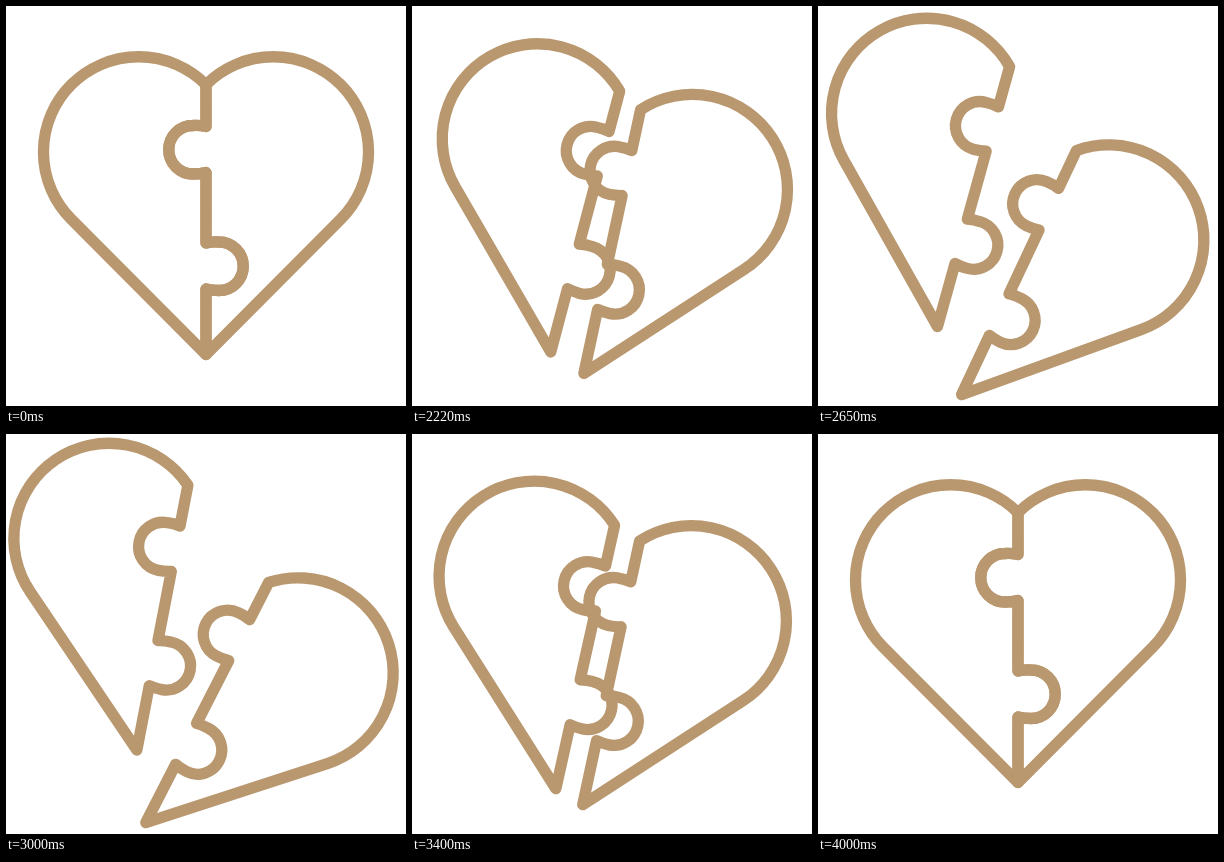
Write an HTML page that moves like this. It is 400 px wide and 400 px high and loops after 4020 ms.

```html
<!DOCTYPE html>
<html lang="en">
<head>
<meta charset="utf-8">
<title>Broken heart</title>
<style>
  html, body { margin: 0; height: 100%; overflow: hidden; background: #fff; }
  svg { display: block; width: 100%; height: 100%; }
  path { fill: none; stroke: #b9986f; stroke-width: 11.3; stroke-linecap: round; stroke-linejoin: round; }
</style>
</head>
<body>
<svg viewBox="0 0 400 400"><path id="left"/><path id="right"/></svg>
<script>
const LOOP = 4020, START = 2000, END = 4000, FIRST_STEP = 2020;

// Both halves share the jigsaw edge; the origin is its middle.
const edge = 'M0-134.3V-92.5Q-7-94-13-93.5A24.2 24.2 0 0 0-13-45Q-6-45 0-46.5' +
  'V24Q7 22.5 13 23A24.2 24.2 0 0 1 13 71.5Q6 71.5 0 70V135.5';

// A half is its side (-1 left, 1 right) with a semicircular lobe.
const halves = ['left', 'right'].map((id, i) => {
  const el = document.getElementById(id), side = 2 * i - 1;
  el.setAttribute('d', `${edge}L${134.7 * side} .2A95 95 0 0 ${1 - i} 0-134.3Z`);
  return { el, side };
});

// Key poses are [time, x, y, angle]; every track starts and ends at zero.
const track = (end, ...keys) => [[START, 0, 0, 0], ...keys, [end, 0, 0, 0]];
const hold = (from, to, ...pose) => [[from, ...pose], [to, ...pose]];

// The heart swings as a whole while the halves move apart by equal amounts.
const swing = track(END,
  [2400, -22.7, 20.7, 23.3],
  ...hold(2800, 3050, -21, 12.5, 19),
  [3400, -13.7, 17.3, 12.4],
  [3640, -3, -16, -5.7]);
const gap = track(3520,
  [2400, 23.3, 22.3, -2.3],
  ...hold(2800, 3050, 22.5, 42.5, 8.1),
  [3400, 13, 8, -0.2]);

// Slope at a key: flat at ends and turning points, so curves never overshoot.
function slope(keys, i, k) {
  if (i === 0 || i === keys.length - 1) return 0;
  const rate = j => (keys[j + 1][k] - keys[j][k]) / (keys[j + 1][0] - keys[j][0]);
  const a = rate(i - 1), b = rate(i);
  return a * b > 0 ? 2 * a * b / (a + b) : 0;
}

function valueAt(keys, t, k) {
  const next = keys.findIndex(key => key[0] > t);
  if (t < FIRST_STEP || next < 0) return 0;
  const p = keys[next - 1], q = keys[next];
  const span = q[0] - p[0], u = (t - p[0]) / span, v = 1 - u;
  return v * v * (1 + 2 * u) * p[k] + u * u * (1 + 2 * v) * q[k] +
    span * u * v * (v * slope(keys, next - 1, k) - u * slope(keys, next, k));
}

function draw() {
  const t = performance.now() % LOOP;
  for (const { el, side } of halves) {
    const [x, y, angle] = [1, 2, 3].map(k => valueAt(swing, t, k) + side * valueAt(gap, t, k));
    el.setAttribute('transform', `translate(${200 + x} ${213 + y}) rotate(${angle})`);
  }
  requestAnimationFrame(draw);
}
draw();
</script>
</body>
</html>
```
